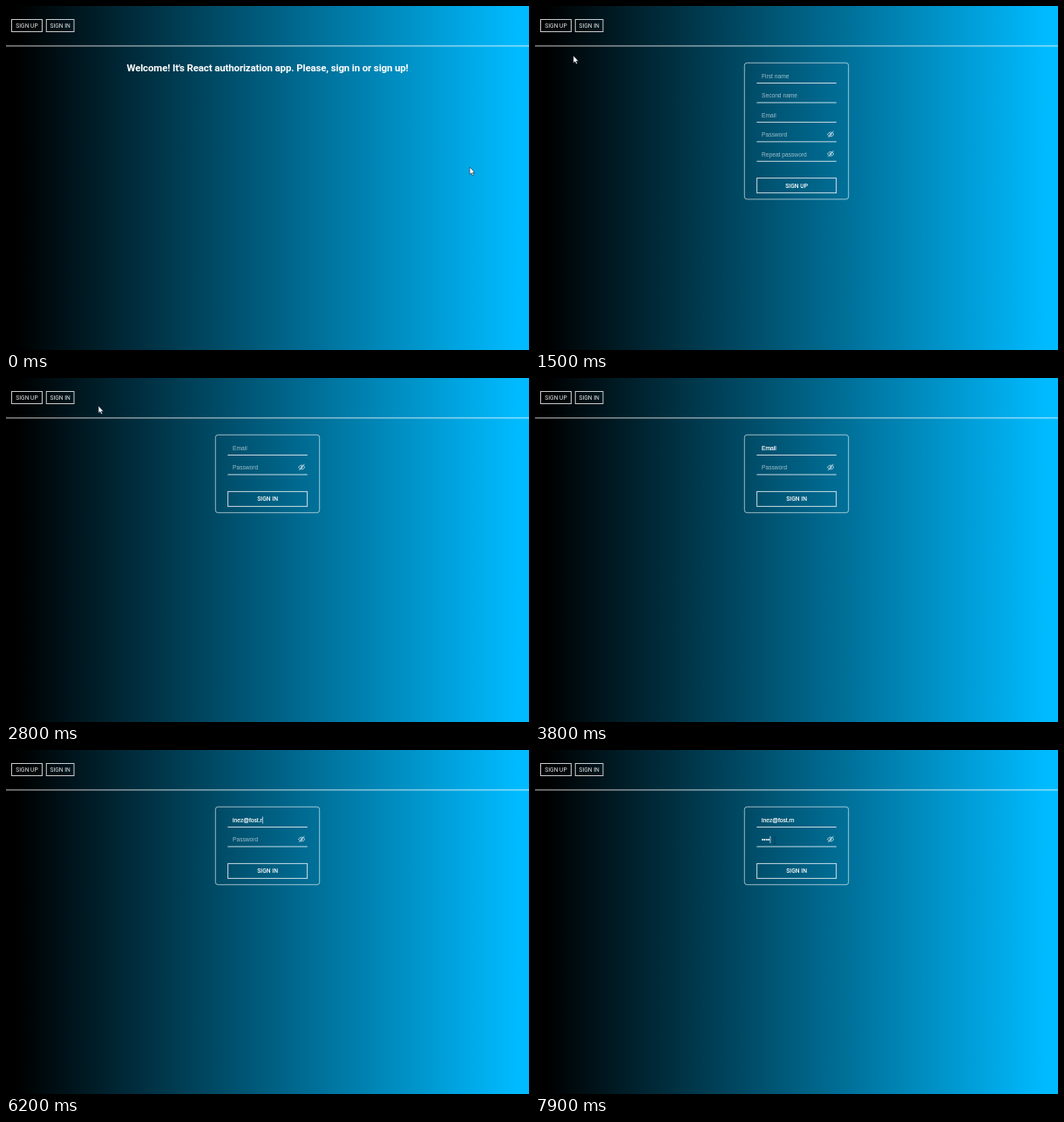
These frames come from a looping animation (600 px wide and 395 px high, 8000 ms). An HTML page:

```html
<!DOCTYPE html>
<html lang="en">
<head>
<meta charset="utf-8">
<title>Authorization app</title>
<style>
  html, body { margin: 0; width: 100%; height: 100%; overflow: hidden; background: #000; }
  svg { display: block; width: 600px; height: 395px; }
  text { fill: #fff; white-space: pre; }
  .title { font: 700 11.5px Roboto, sans-serif; letter-spacing: -.145px; text-anchor: middle; }
  .nav { font: 400 6.7px Roboto, sans-serif; fill-opacity: .9; text-anchor: middle; }
  .submit { font: 500 6.75px Roboto, sans-serif; text-anchor: middle; }
  .field { font: 400 6.67px "Liberation Sans", Arial, sans-serif; fill: #fff; fill-opacity: .62; }
  .field.on { fill-opacity: 1; stroke: #fff; stroke-width: .18px; }
  .line { fill: #fff; fill-opacity: .78; }
  .frame { fill: none; stroke: #fff; stroke-opacity: .6; }
  .box { fill: none; stroke: #fff; stroke-opacity: .78; }
  .box.hover { fill: #fff; }
  .hover + text { fill: #777; }
  .eye { fill: none; stroke: #fff; stroke-width: .75; stroke-opacity: .85; }
</style>
</head>
<body>
<svg id="stage" viewBox="0 0 600 395">
  <defs>
    <linearGradient id="sky">
      <stop offset="2%" stop-color="#000"/>
      <stop offset="98%" stop-color="#00bbff"/>
    </linearGradient>
  </defs>
  <rect width="600" height="395" fill="url(#sky)"/>
  <rect class="line" y="45.4" width="600" height="1"/>
</svg>
<script>
const LOOP = 8000;
const EMAIL = "inez@fost.rn";
const stage = document.getElementById("stage");

function add(parent, tag, attrs, text) {
  const node = document.createElementNS("http://www.w3.org/2000/svg", tag);
  for (const key in attrs) node.setAttribute(key, attrs[key]);
  if (text) node.textContent = text;
  return parent.appendChild(node);
}

const show = (node, on) => node.setAttribute("visibility", on ? "visible" : "hidden");

function button(parent, cls, x, y, width, height, label) {
  const box = add(parent, "rect", { class: "box", x, y, width, height });
  add(parent, "text", { class: cls, x: x + width / 2, y: y + height / 2 + 2.4 }, label);
  return box;
}

function eye(parent, y) {
  const g = add(parent, "g", { class: "eye", transform: `translate(339.2 ${y})` });
  add(g, "path", { d: "M-3.8 0Q0 -4.8 3.8 0Q0 4.8 -3.8 0Z" });
  add(g, "circle", { r: .9 });
  add(g, "path", { d: "M-3 3.5L3.3 -3.7" });
}

function form(labels, height, submit) {
  const g = add(stage, "g", {});
  add(g, "rect", { class: "frame", x: 240.3, y: 65.3, width: 119.4, height, rx: 3 });
  const fields = labels.map((label, i) => {
    const y = 88 + 22.45 * i;
    add(g, "rect", { class: "line", x: 254.3, y, width: 91.5, height: 1 });
    if (/password/i.test(label)) eye(g, y - 8);
    return add(g, "text", { class: "field", x: 260, y: y - 5.3 }, label);
  });
  button(g, "submit", 254.6, 41 + height, 91, 17, submit);
  return { g, fields };
}

const navUp = button(stage, "nav", 6.5, 15.5, 35, 14, "SIGN UP");
const navIn = button(stage, "nav", 46.3, 15.5, 31.7, 14, "SIGN IN");
const title = add(stage, "text", { class: "title", x: 300, y: 75.4 },
  "Welcome! It's React authorization app. Please, sign in or sign up!");
const signUp = form(["First name", "Second name", "Email", "Password", "Repeat password"], 156.6, "SIGN UP");
const signIn = form(["Email", "Password"], 89.4, "SIGN IN");
const [email, password] = signIn.fields;
const caret = add(stage, "rect", { width: .8, height: 8, fill: "#fff", "fill-opacity": .85 });

const outline = { fill: "#fff", stroke: "#123", "stroke-width": .6, "stroke-linejoin": "round" };
const pointers = {
  arrow: add(stage, "path", { ...outline, d: "M0 0V8.4L1.9 6.7L3.2 9.6L4.6 9L3.3 6.2H5.8Z" }),
  hand: add(stage, "path", { ...outline,
    d: "M-.8 .4Q0 -.6 .8 .4V3.6L4.3 4.4Q5 4.7 4.9 5.6L4.2 9.2V10.6H-.8V9.4L-3.2 6.4Q-3 5.2 -1.9 5.9L-.8 6.8Z" }),
  beam: add(stage, "path", { d: "M-1.5 -4H1.5M0 -4V4M-1.5 4H1.5", fill: "none",
    stroke: "#023", "stroke-width": .7, "stroke-opacity": .45 })
};

// time, x, y of the mouse
const path = [
  [0, 532, 185], [100, 532, 185], [600, 40, 58], [700, 22, 41], [850, 24, 22],
  [1250, 24, 22], [1500, 44, 57], [1800, 46, 56], [2050, 66, 24], [2200, 66, 22],
  [2500, 66, 22], [2700, 86, 26], [3200, 275, 82], [6700, 275, 82], [7000, 275, 104], [LOOP, 275, 104]
];

function mouseAt(t) {
  const i = path.findIndex(p => p[0] > t);
  const [t0, x0, y0] = path[i - 1], [t1, x1, y1] = path[i];
  const k = (t - t0) / (t1 - t0), e = k * k * (3 - 2 * k);
  return [x0 + (x1 - x0) * e, y0 + (y1 - y0) * e];
}

const between = (v, a, b) => v >= a && v < b;
const typed = (t, start, step, max) =>
  t < start ? 0 : Math.min(max, 1 + Math.floor((t - start) / step));

function setField(node, text, on) {
  if (node.textContent !== text) node.textContent = text;
  node.classList.toggle("on", on);
}

function drawMouse(t) {
  const [x, y] = mouseAt(t);
  const inRow = between(y, 15, 30);
  const overUp = inRow && between(x, 6, 42), overIn = inRow && between(x, 46, 79);
  navUp.classList.toggle("hover", overUp);
  navIn.classList.toggle("hover", overIn);
  const inField = t > 2700 && x > 254 && between(y, 70, 112);
  const kind = overUp || overIn ? "hand" : inField ? "beam" : "arrow";
  for (const name in pointers) {
    show(pointers[name], name === kind && !between(t, 3700, 6700));
    pointers[name].setAttribute("transform", `translate(${x} ${y})`);
  }
}

function drawCaret(t, count, start, step, focus, field) {
  const last = count ? start + (count - 1) * step : focus;
  show(caret, Math.floor((t - last) / 500) % 2 === 0);
  caret.setAttribute("x", 260 + (count ? field.getComputedTextLength() + .2 : 0));
  caret.setAttribute("y", field === email ? 76.5 : 98.9);
}

function render(t) {
  show(title, t < 1100);
  show(signUp.g, between(t, 1100, 2100));
  show(signIn.g, t >= 2100);
  const letters = typed(t, 4600, 155, EMAIL.length);
  const dots = typed(t, 7400, 150, 4);
  setField(email, EMAIL.slice(0, letters) || "Email", t >= 3300);
  setField(password, "•".repeat(dots) || "Password", t >= 7100);
  if (t < 3300) show(caret, false);
  else if (t < 7100) drawCaret(t, letters, 4600, 155, 3300, email);
  else drawCaret(t, dots, 7400, 150, 7100, password);
  drawMouse(t);
}

const begin = performance.now();
function tick() {
  render((performance.now() - begin) % LOOP);
  requestAnimationFrame(tick);
}
tick();
</script>
</body>
</html>
```
